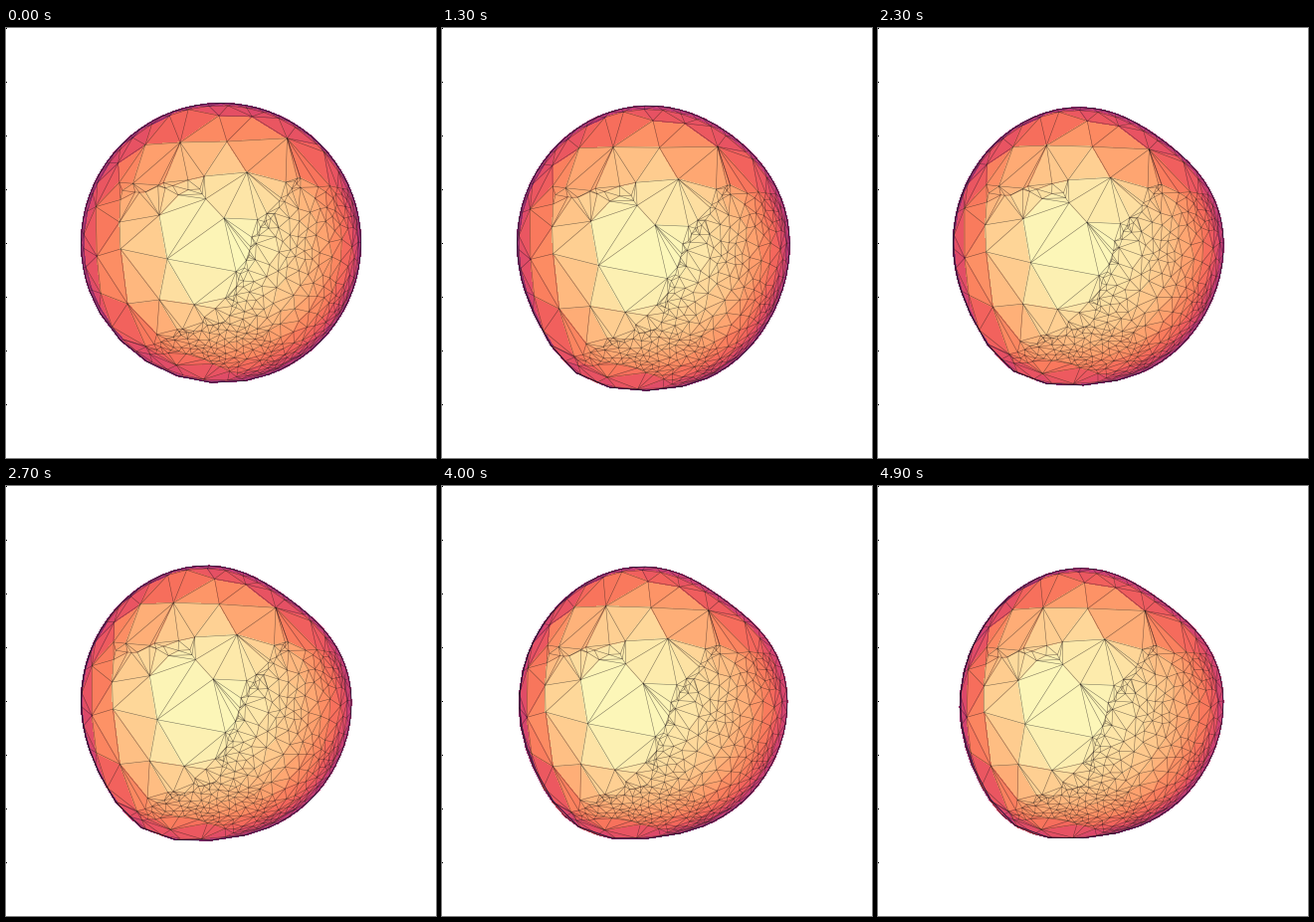
Animation of 432 by 432 pixels, one loop 5.5 s. Source, as a matplotlib script:

```python
import numpy as np
import matplotlib.pyplot as plt
from matplotlib.animation import FuncAnimation
from matplotlib.collections import LineCollection, PolyCollection
from matplotlib.path import Path
from matplotlib.tri import Triangulation

SIZE, CENTER, RADIUS = 432, 216, 140.5
STEPS, HOLD = 50, 5
rng = np.random.default_rng(7)


def to_unit(points):
    return (np.asarray(points, float) - CENTER) / RADIUS


def lift(xy):
    """Place flat unit-disc points on the front hemisphere."""
    z = np.sqrt(np.clip(1 - (xy ** 2).sum(1), 0, 1))
    return np.column_stack([xy, z])


def circle(degrees, radius=1.0):
    a = np.radians(degrees)
    return radius * np.column_stack([np.cos(a), -np.sin(a)])


def smoothstep(x, start, end):
    u = np.clip((x - start) / (end - start), 0, 1)
    return u * u * (3 - 2 * u)


# ---- mesh: large faces on the left, a fine patch at lower right ----
HUBS = [(219, 191), (242, 145), (296, 151), (162, 232), (189, 278),
        (154, 273), (115, 222), (154, 188), (114, 195), (199, 149),
        (222, 114), (175, 115), (214, 88), (122, 277)]
CREASE = [(107, 163), (150, 161), (202, 164)]
BORDER = [(296, 151), (250, 212), (232, 258), (225, 293), (141, 320)]
PATCH = Path(to_unit(BORDER + [(141, 328), (190, 328), (245, 358),
                               (330, 312), (364, 216), (340, 160)]))


def strand(line, count, spread):
    """Points spaced evenly along a line, scattered by spread pixels."""
    line = np.array(line, float)
    length = np.r_[0, np.hypot(*np.diff(line, axis=0).T).cumsum()]
    s = np.linspace(0, length[-1], count)
    points = np.column_stack([np.interp(s, length, axis) for axis in line.T])
    return to_unit(points + rng.normal(0, spread, points.shape))


def spacing(x, y):
    """Smallest allowed gap between neighbouring vertices."""
    r = np.hypot(x, y)
    if PATCH.contains_point((x, y)):
        fine = 0.6 if y > 0.58 and x < 0.4 else 1
        return fine * (0.075 + 0.025 * np.sin(9 * x) * np.sin(8 * y + 1))
    if r > 0.93:
        return 0.19
    return 0.28 if r > 0.75 else 0.36


def build_mesh():
    rim = circle(np.r_[-70:205:5, 210:285:14])
    ring = circle(np.arange(0, 360, 8) + rng.uniform(-2, 2, 45), 0.983)
    fixed = np.vstack([rim, ring, to_unit(HUBS), strand(CREASE, 18, 5),
                       strand(BORDER, 36, 1), strand(BORDER, 46, 6)])
    points = list(lift(fixed))
    height = rng.uniform(0.2, 1, 6000)
    angle = rng.uniform(0, 360, 6000)
    darts = circle(angle) * np.sqrt(1 - height ** 2)[:, None]
    for p in lift(darts):
        if np.linalg.norm(np.array(points) - p, axis=1).min() > spacing(*p[:2]):
            points.append(p)
    points = np.array(points)
    # Delaunay in the stereographic plane equals Delaunay on the sphere
    plane = points[:, :2] / (1 + points[:, 2:])
    mesh = Triangulation(plane[:, 0], plane[:, 1])
    return points, mesh.triangles, mesh.edges, len(rim)


POINTS, FACES, EDGES, RIM_COUNT = build_mesh()
XY, DEPTH = POINTS[:, :2], POINTS[:, 2]
LEVEL = np.hypot(*XY.T)
THETA = np.degrees(np.arctan2(-XY[:, 1], XY[:, 0]))

# ---- motion: dents and bulges grow while the front face drifts ----
# direction (degrees), width, pixels outward, first and last step
BUMPS = [(20, 40, -8, 0, 18), (57, 22, -13, 0, 32), (240, 16, 11, 0, 12),
         (280, 30, 6, 0, 8), (280, 30, -11, 13, 32), (330, 25, -4, 0, 18),
         (165, 45, -8, 34, 49)]
DRIFT_STEPS = [0, 13, 27, 34, 49]
DRIFT_X = [0, -5, -11, -18, -16]
DRIFT_Y = [0, 7, 3, 7, 8]
MAGMA = plt.get_cmap("magma")


def swelling(step):
    total = np.zeros(len(XY))
    for direction, width, amount, start, end in BUMPS:
        away = (THETA - direction + 180) % 360 - 180
        total += amount * np.exp(-0.5 * (away / width) ** 2) * smoothstep(step, start, end)
    return total / RADIUS


def pose(step):
    grown = smoothstep(step, 0, 40)
    drift = np.array([np.interp(step, DRIFT_STEPS, d) for d in (DRIFT_X, DRIFT_Y)])
    xy = XY * (1 + swelling(step) * LEVEL ** 2)[:, None]
    xy = xy + DEPTH[:, None] * drift / RADIUS
    z = DEPTH * (1 - 0.15 * grown) - grown * (XY @ [0.08, 0.06])
    a, b, c = np.column_stack([xy, z])[FACES].transpose(1, 0, 2)
    normal = np.cross(b - a, c - a)
    facing = np.abs(normal[:, 2]) / (np.linalg.norm(normal, axis=1) + 1e-12)
    return CENTER + RADIUS * xy, MAGMA(0.45 + 0.535 * facing)


# ---- drawing ----
fig = plt.figure(figsize=(6, 6), dpi=72, facecolor="white")
ax = fig.add_axes([0, 0, 1, 1])
ax.set(xlim=(0, SIZE), ylim=(SIZE, 0))
ax.axis("off")
ax.hlines(np.arange(0, SIZE, 54) + 0.5, 0, 1, color="black", lw=1).set_snap(False)

faces = PolyCollection([], edgecolors="face", linewidths=0.3, antialiaseds=False)
wires = LineCollection([], colors=[(0.13, 0.1, 0.1, 0.58)], linewidths=0.55)
outline = PolyCollection([], facecolors="none", edgecolors="#35134f", linewidths=0.8)
for artist in (faces, wires, outline):
    ax.add_collection(artist, autolim=False)


def draw(frame):
    xy, colors = pose(min(frame, STEPS - 1))
    faces.set_verts(xy[FACES])
    faces.set_facecolor(colors)
    wires.set_segments(xy[EDGES])
    outline.set_verts([xy[:RIM_COUNT]])
    return faces, wires, outline


anim = FuncAnimation(fig, draw, frames=STEPS + HOLD, interval=100,
                     repeat=True, repeat_delay=0)
plt.show()
```
